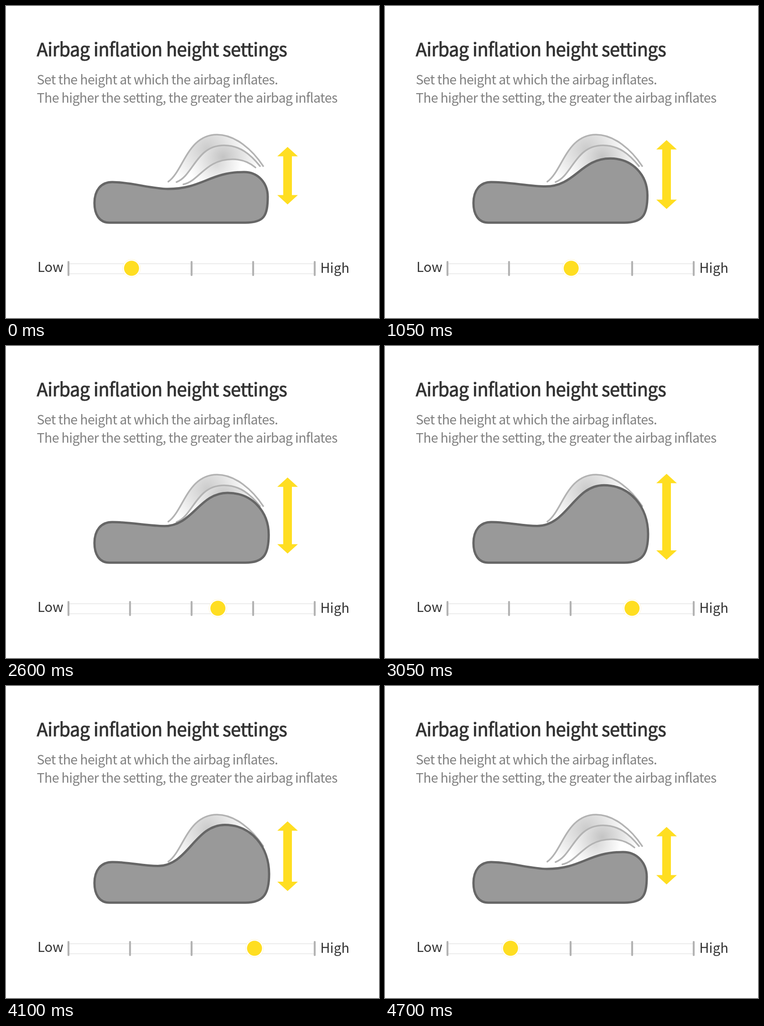
Animation, 818 px wide and 684 px high, one loop 6 s. Source, as an HTML page:

```html
<!DOCTYPE html>
<html lang="en">
<head>
<meta charset="utf-8">
<title>Airbag inflation height settings</title>
<style>
  html, body { margin: 0; width: 100%; height: 100%; overflow: hidden; background: #fff; }
  svg { display: block; width: 818px; height: 684px; }
  text { font-family: "Noto Sans CJK KR", "Noto Sans CJK JP", "Noto Sans CJK SC", "Noto Sans", sans-serif; }
  .title { font-size: 39.7px; letter-spacing: -.0125em; fill: #333; stroke: #333; stroke-width: 1px; }
  .note { font-size: 28.6px; letter-spacing: -.0235em; fill: #808080; }
  .label { font-size: 29.4px; fill: #333; }
  .bag { stroke: #b3b3b3; stroke-width: 3.6; stroke-linecap: round; }
  .tick { stroke: #b3b3b3; stroke-width: 4.2; stroke-linecap: round; }
</style>
</head>
<body>
<svg viewBox="0 0 818 684">
  <defs>
    <radialGradient id="g1" gradientUnits="userSpaceOnUse" cx="442" cy="314" r="90">
      <stop stop-color="#cbcbcb"/><stop offset="1" stop-color="#fff"/>
    </radialGradient>
    <radialGradient id="g2" gradientUnits="userSpaceOnUse" cx="476" cy="331" r="80">
      <stop stop-color="#c4c4c4"/><stop offset="1" stop-color="#fff"/>
    </radialGradient>
    <radialGradient id="g3" gradientUnits="userSpaceOnUse" cx="462" cy="345" r="56">
      <stop stop-color="#d8d8d8"/><stop offset="1" stop-color="#fff"/>
    </radialGradient>
  </defs>

  <text class="title" x="67.6" y="110">Airbag inflation height settings</text>
  <text class="note" x="67.5" y="172">Set the height at which the airbag inflates.</text>
  <text class="note" x="67.5" y="212">The higher the setting, the greater the airbag inflates</text>

  <path class="bag" fill="url(#g1)" d="M356 385C389 362 398 282 463 282C503 282 541 316 564 351"/>
  <path class="bag" fill="url(#g2)" d="M374 386C411 372 417 305.5 478 305.5C513 305.5 536 325 557 351"/>
  <path class="bag" fill="url(#g3)" d="M389 391C424 384 437 336 497 336C519 336 534 343 547 354"/>

  <path id="pillow" fill="#999" stroke="#666" stroke-width="5" stroke-linejoin="round"/>
  <path id="arrow" fill="#ffde21"/>

  <path d="M139 565H676M139 587H676" stroke="#e6e6e6" stroke-width="1.5"/>
  <g id="ticks"></g>
  <g id="knob">
    <circle cy="575" r="19.5" fill="#fff" stroke="#fff6d2"/>
    <circle cy="575" r="16.5" fill="#ffde21"/>
  </g>
  <text class="label" x="68.9" y="583">Low</text>
  <text class="label" x="689.2" y="585">High</text>
</svg>
<script>
const LOOP = 6000, STEP = 50;
const $ = id => document.getElementById(id);

for (let i = 0; i < 5; i++)
  $("ticks").innerHTML += `<path class="tick" d="M${137 + 135 * i} 561V590"/>`;

const levels = [
  { knob: 275.3, sag: 1, top: 309, end: 435 },
  { knob: 408.3, sag: .5, top: 294, end: 445 },
  { knob: 545, sag: 0, top: 280, end: 469 }
];

// lead: how much earlier the arrow sets off
const moves = [
  { start: 650, span: 400, from: 0, to: 1, lead: 0 },
  { start: 2350, span: 800, from: 1, to: 2, lead: 0 },
  { start: 4137, span: 560, from: 2, to: 0, lead: 277 }
];

const ease = u => 1 - (1 - u ** 1.25) ** 2;

function value(key, t, early = 0) {
  const begun = m => t >= m.start - m.lead * early;
  const m = moves.filter(begun).pop();
  if (!m) return levels[0][key];
  const u = Math.min(1, (t - m.start + m.lead * early) / m.span);
  const a = levels[m.from][key], b = levels[m.to][key];
  return a + (b - a) * ease(u);
}

// A dip, a hump and a right side, all placed by the sag (0 = fully inflated).
function pillow(sag) {
  const dip = [333 + 22 * (1 - (1 - sag) ** 3), 394.5 + 6.5 * sag ** 2.6];
  const hump = [480 + 42 * sag ** 1.6, 304.5 + 59.5 * sag];
  const side = [577 - 3 * sag, 412 + 6 * sag];
  const reach = .45 * (hump[0] - dip[0]);
  return `M233 386C273 386 ${dip[0] - 35} ${dip[1]} ${dip}
    C${dip[0] + reach} ${dip[1]} ${hump[0] - reach} ${hump[1]} ${hump}
    C${hump[0] + .6 * (side[0] - hump[0])} ${hump[1]}
     ${side[0]} ${side[1] - .55 * (side[1] - hump[1])} ${side}
    C${side[0]} ${side[1] + 42} 566 475 525 475
    H227C204 475 194 456 194 432C194 404 208 386 233 386Z`;
}

function arrow(top, end) {
  const a = top + 20.5, b = end - 20.5;
  return `M617.5 ${top}L640 ${a}H627V${b}H640L617.5 ${end}L595 ${b}H608V${a}H595Z`;
}

function draw(t) {
  $("pillow").setAttribute("d", pillow(value("sag", t)));
  $("arrow").setAttribute("d", arrow(value("top", t, 1), value("end", t, 1)));
  $("knob").setAttribute("transform", `translate(${value("knob", t)} 0)`);
}

const begin = performance.now();
function tick() {
  const t = (performance.now() - begin) % LOOP;
  draw(Math.floor(t / STEP) * STEP);
  requestAnimationFrame(tick);
}
tick();
</script>
</body>
</html>
```
